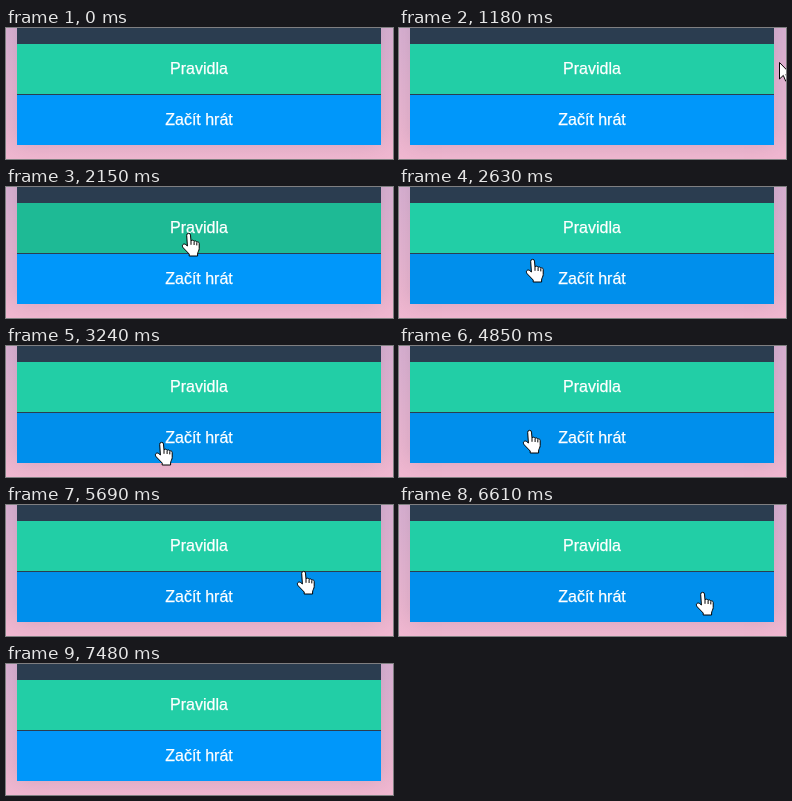
An HTML page that plays this animation: 387 px wide and 131 px high, repeating every 8370 ms.

```html
<!DOCTYPE html>
<html lang="cs">
<head>
<meta charset="utf-8">
<style>
  html, body { margin: 0; width: 100%; height: 100%; overflow: hidden; }
  body { position: relative; background: linear-gradient(#d8b0d2, #f0b7d0 131px); }
  .card {
    position: absolute; left: 11px; top: -60px; width: 364px; height: 177px;
    background: #2b3d50; box-shadow: 0 0 20px rgba(0, 0, 0, .1);
  }
  .button {
    position: absolute; left: 0; width: 100%; height: 50px;
    font: 16px/50px "Liberation Sans", Arial, sans-serif;
    text-align: center; color: #fff; -webkit-text-stroke: .25px #fff;
  }
  #rules { top: 76px; background: #22cea6; }
  #rules.hover { background: #1eba95; }
  #play { top: 127px; background: #0097fa; }
  #play.hover { background: #008fec; }
  #cursor { position: absolute; left: 0; top: 0; overflow: visible; }
  #cursor path { fill: #fff; stroke: #000; stroke-linejoin: round; }
</style>
</head>
<body>
<div class="card">
  <div class="button" id="rules">Pravidla</div>
  <div class="button" id="play">Začít hrát</div>
</div>
<svg id="cursor" width="18" height="25">
  <g id="hand">
    <path d="M5.4 13L4.7 2.4a1.9 1.9 0 0 1 3.8-.3L9 8c.5-1.3 2.9-1 3.1.5c.5-1 2.5-.7 2.7.8c.6-.9 2.4-.4 2.4 1.2V15.5c0 2.2-1.6 3.5-1.6 5.5v2H7.2v-2L1.2 14.8C-1 12 1.8 10 3.8 11.6z"/>
    <path d="M9 8V11.8M12.1 8.8V12M14.8 9.6V12.4"/>
  </g>
  <path id="arrow" d="M6.5 .5V17l3.8-3.6 2.4 5.7 2.6-1.1-2.4-5.5h5.2z"/>
</svg>
<script>
const LOOP = 8370;

// Turning points of the pointer; rest is the pause before it moves on
const stops = [
  { at: 900, x: 395, y: 34 },
  { at: 2150, x: 176, y: 46 },
  { at: 2680, x: 126, y: 74 },
  { at: 3240, x: 149, y: 96 },
  { at: 4110, x: 214, y: 44, rest: 280 },
  { at: 4850, x: 124, y: 84 },
  { at: 5690, x: 291, y: 66 },
  { at: 5920, x: 312, y: 46, rest: 280 },
  { at: 6610, x: 297, y: 87, rest: 180 },
  { at: 7480, x: 392, y: 36 }
];
const $ = id => document.getElementById(id);
const leave = stop => stop.at + (stop.rest || 0);

// Velocity at a stop; zero where the axis turns or rests
function velocity(i, axis) {
  const a = stops[i - 1], b = stops[i], c = stops[i + 1];
  if (!a || !c || b.rest || (b[axis] - a[axis]) * (c[axis] - b[axis]) <= 0) return 0;
  return (c[axis] - a[axis]) / (c.at - leave(a));
}

// Smooth cubic curve from stop i to the next one
function position(i, axis, t) {
  const a = stops[i], b = stops[i + 1], span = b.at - leave(a);
  const u = Math.max(0, (t - leave(a)) / span), v = 1 - u;
  return Math.round(
    a[axis] * v * v * (1 + 2 * u) + b[axis] * u * u * (3 - 2 * u) +
    span * u * v * (velocity(i, axis) * v - velocity(i + 1, axis) * u));
}

function draw() {
  const t = performance.now() % LOOP;
  const i = stops.filter(stop => stop.at <= t).length - 1;
  const shown = i >= 0 && i < stops.length - 1;
  const x = shown ? position(i, "x", t) : 400;
  const y = shown ? position(i, "y", t) : 0;
  const over = x + 6 < 375;

  $("cursor").style.display = shown ? "" : "none";
  $("cursor").style.transform = `translate(${x}px, ${y}px)`;
  $("hand").style.display = over ? "" : "none";
  $("arrow").style.display = over ? "none" : "";
  $("rules").classList.toggle("hover", over && y < 66);
  $("play").classList.toggle("hover", over && y >= 66);
  requestAnimationFrame(draw);
}
draw();
</script>
</body>
</html>
```
